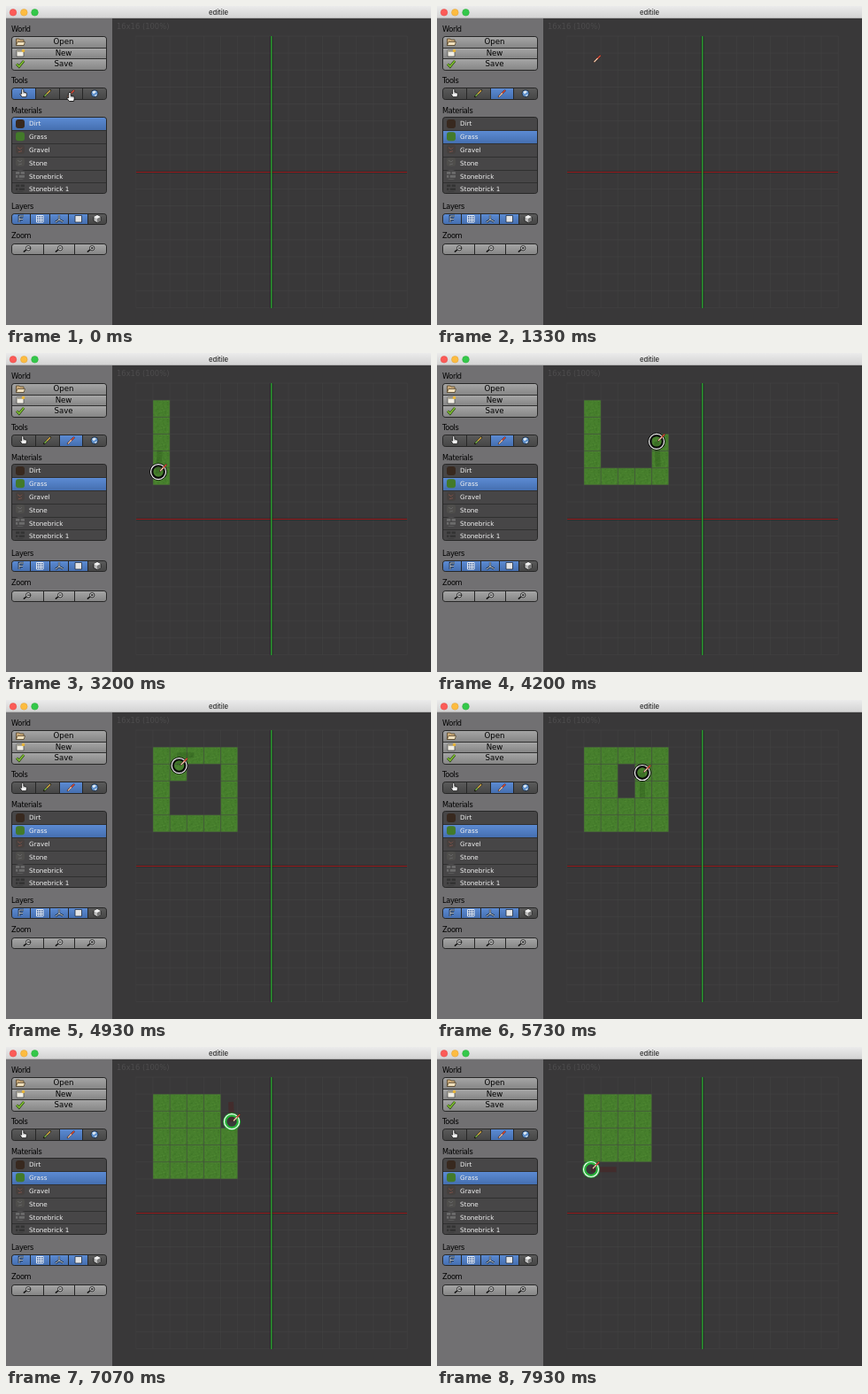
Recreate the animation shown at these times as an HTML page. Size 480x360 px, loop 8 s.

```html
<!DOCTYPE html>
<html lang="en">
<head>
<meta charset="utf-8">
<title>editile</title>
<style>
html, body { margin: 0; width: 100%; height: 100%; overflow: hidden; }
body { position: relative; background: #393839; font-family: "DejaVu Sans", sans-serif; }
#title {
  position: absolute; left: 0; top: 0; width: 480px; height: 14px; box-sizing: border-box;
  background: linear-gradient(#ebebeb, #d4d4d4); border-bottom: 1px solid #b4b4b4;
  font: 500 7.7px/15.6px Inter, sans-serif; color: #2b2b2b; text-align: center;
}
#side { position: absolute; left: 0; top: 14px; width: 120px; height: 346px; background: #717072; }
h2 {
  position: absolute; left: 6px; margin: 0; font-weight: normal; font-size: 8.2px;
  line-height: 10px; letter-spacing: -.35px; color: #000;
}
.bar {
  position: absolute; left: 6px; width: 108px; box-sizing: border-box; display: flex;
  border: 1px solid #272727; border-radius: 3.5px; overflow: hidden; background: #272727;
}
.col { flex-direction: column; }
.bar > div { flex: 1; background: linear-gradient(#5a5a5a, #464646); }
.bar > div + div { border-left: 1px solid #272727; }
.bar.col > div + div { border-left: 0; border-top: 1px solid #303030; }
.bar.light > div { background: linear-gradient(#a5a5a5, #868686); }
.col.light { font-size: 8.6px; line-height: 11.6px; text-align: center; text-indent: 10px; color: #000; }
#mats { font-size: 7.2px; line-height: 13.8px; text-indent: 19px; color: #f0f0f0; }
#mats > div { background: #474647; }
.bar > div.on, #mats > div.on { background: linear-gradient(#5c8bd3, #456fb0); }
svg { position: absolute; left: 0; top: 0; }
</style>
</head>
<body>
<div id="side"></div>
<div id="title">editile</div>

<h2 style="top:20.5px">World</h2>
<div class="bar col light" style="top:34px;height:38.5px"><div>Open</div><div>New</div><div>Save</div></div>
<h2 style="top:79px">Tools</h2>
<div class="bar" id="tools" style="top:92px;height:13.5px"><div></div><div></div><div></div><div></div></div>
<h2 style="top:112.5px">Materials</h2>
<div class="bar col" id="mats" style="top:125.4px;height:86.5px"><div>Dirt</div><div>Grass</div><div>Gravel</div><div>Stone</div><div>Stonebrick</div><div>Stonebrick 1</div></div>
<h2 style="top:220.5px">Layers</h2>
<div class="bar" style="top:233.5px;height:13.5px"><div class="on"></div><div class="on"></div><div class="on"></div><div class="on"></div><div></div></div>
<h2 style="top:254px">Zoom</h2>
<div class="bar light" style="top:267.5px;height:13.5px"><div></div><div></div><div></div></div>

<svg width="480" height="360" viewBox="0 0 480 360">
  <defs>
    <g id="hand">
      <path d="M-1.3 0Q0-1.6 1.2 0V3.2L4.6 4Q5.6 4.4 5.3 6L4.6 9.5H-.6L-3.4 6Q-3.6 4.6-1.3 5.6Z" fill="#f4f4f4" stroke="#111" stroke-width=".9"/>
      <path d="M1.2 3.4V5.2M2.8 3.8V5.4M4.2 4V5.6" stroke="#222" stroke-width=".5"/>
    </g>
    <g id="brush" stroke-linecap="round">
      <path d="M2-1L8.8-7.8" stroke="#3a1d18" stroke-width="2"/>
      <path d="M5-4L8.8-7.8" stroke="#e0503c" stroke-width="1.3"/>
      <path d="M2.3-1.2L5.6-4.6" stroke="#f0cdb0" stroke-width="1.3"/>
    </g>
    <g id="lens">
      <path d="M-1 1L-3.600 3.200" stroke="#151515" stroke-width="1.600" stroke-linecap="round"/>
      <circle cx="1.200" cy="-.800" r="2.700" fill="#c9c9c9" stroke="#222" stroke-width=".9"/>
    </g>
    <g id="grass"></g>
  </defs>

  <g stroke-width=".5">
    <circle cx="8" cy="7.3" r="3.8" fill="#fc5b57" stroke="#df4744"/>
    <circle cx="20.3" cy="7.3" r="3.8" fill="#fdbc40" stroke="#de9f34"/>
    <circle cx="32.5" cy="7.3" r="3.8" fill="#34c84a" stroke="#27aa35"/>
  </g>

  <!-- file icons -->
  <path d="M11.5 44.5V37H15L16 38H20V44.5Z" fill="#c9a878" stroke="#4a3a22" stroke-width=".7"/>
  <path d="M11.5 44.5L13 40.5H21.5L20 44.5Z" fill="#f0e0bd" stroke="#4a3a22" stroke-width=".7"/>
  <path d="M12 50H20V57H12Z" fill="#f1eee4" stroke="#444" stroke-width=".7"/>
  <path d="M12 50H20V52H12Z" fill="#a9a596"/>
  <circle cx="19.5" cy="50.5" r="1.8" fill="#e8b53a"/>
  <path d="M12 65.5L14.8 68.3L20.2 61.8" fill="none" stroke="#26400f" stroke-width="2.8"/>
  <path d="M12 65.5L14.8 68.3L20.2 61.8" fill="none" stroke="#7fc030" stroke-width="1.6"/>

  <!-- tool icons -->
  <use href="#hand" transform="translate(18.8 94.3) scale(.88)"/>
  <path d="M43 102.2L50 95.2" stroke="#1c1c12" stroke-width="2.2" stroke-linecap="round"/>
  <path d="M43.5 101.7L46 99.2" stroke="#7fbf4a" stroke-width="1.3"/>
  <path d="M46 99.2L50 95.2" stroke="#e5b64a" stroke-width="1.3"/>
  <use href="#brush" x="67.8" y="103.3"/>
  <circle cx="100" cy="98.7" r="4" fill="#5d8fcb" stroke="#1d2733" stroke-width=".8"/>
  <path d="M97.3 97Q100 94.6 102 97Q100 98 99 99.5Z" fill="#dfe9f2"/>
  <path d="M100 101Q102 99.2 103 100Q102 102 100.5 102Z" fill="#cfdbe6"/>

  <g id="swatches"></g>

  <!-- layer icons -->
  <path d="M15 244V237H20M15 240.5H19" fill="none" stroke="#14202f" stroke-width="2.6"/>
  <path d="M15 244V237H20M15 240.5H19" fill="none" stroke="#c9d6e8" stroke-width=".9"/>
  <path d="M34.5 236.5H42V244H34.5ZM37 236.5V244M39.5 236.5V244M34.5 239H42M34.5 241.5H42" fill="#3d62a0" stroke="#eef2f7" stroke-width=".9"/>
  <path d="M60 236V241L56 244M60 241L64.5 243.5" fill="none" stroke="#15202e" stroke-width="2.2"/>
  <path d="M60 236V241L56 244M60 241L64.5 243.5" fill="none" stroke="#dfe8f2" stroke-width=".9"/>
  <path d="M78 236.5H85.5V244H78Z" fill="#e4e4e4" stroke="#1f2c40" stroke-width=".8"/>
  <path d="M103 236L107 238V242.5L103 244.7L99 242.5V238Z" fill="#bdbdbd" stroke="#111" stroke-width=".8"/>
  <path d="M99 238L103 240L107 238L103 236Z" fill="#f2f2f2"/>
  <path d="M103 240L107 238V242.5L103 244.7Z" fill="#777"/>

  <!-- zoom icons -->
  <use href="#lens" x="24" y="274"/><use href="#lens" x="60" y="274"/><use href="#lens" x="96" y="274"/>
  <path d="M24 273.2H28M60 273.2H62.5M96 273.2H98.5M97.2 272V274.4" stroke="#111" stroke-width="1"/>

  <text x="125" y="26.4" font-size="8.4" fill="#4d4c4d">16x16 (100%)</text>
  <g id="tiles"></g>
  <path id="grid" stroke="#484748" stroke-opacity=".55" stroke-width=".8"/>
  <path d="M147 187.5H453" stroke="#1c1a1c" stroke-opacity=".35" stroke-width="3"/>
  <path d="M147 187.5H453" stroke="#961a1d"/>
  <path d="M299.8 34V341" stroke="#141814" stroke-opacity=".5" stroke-width="3.2"/>
  <path d="M299.8 34V341" stroke="#2cc035" stroke-width="1.1"/>

  <path id="trail" fill="none" stroke-width="6"/>
  <g id="cursor">
    <g id="ring" fill="none">
      <circle id="halo" r="7.8" stroke-width="4.2"/>
      <circle r="8.5" stroke="#f4f4f4" stroke-width="1.2"/>
    </g>
    <use id="shape" href="#hand"/>
  </g>
</svg>

<script>
const LOOP = 8000, CELL = 19.15, LEFT = 146.8, TOP = 34, STEP = 5;
const $ = id => document.getElementById(id);

// pointer path: time, x, y
const path = [
  [0, 72, 98], [300, 72, 98], [700, 44, 147], [930, 44, 147], [1330, 175.5, 64],
  [1530, 175.5, 64], [1730, 176, 64.5], [2000, 176.5, 64], [2200, 176.5, 64],
  [2450, 176, 76], [3000, 172, 136], [3200, 172, 134], [3300, 176, 139],
  [3680, 250, 140], [3860, 249, 108], [4200, 248, 100], [4480, 249, 63],
  [4850, 196, 62], [5240, 194, 120], [5490, 232, 120], [5730, 232, 82],
  [5890, 214, 81], [6080, 213, 104], [6300, 213, 104], [6750, 254, 62],
  [6860, 254, 62], [7070, 255, 84], [7400, 254, 139], [7930, 174, 138], [8000, 174, 138]
];
const presses = [
  { from: 120, to: 260 },
  { from: 800, to: 910 },
  { from: 2200, to: 6200, paint: true },
  { from: 6840, to: LOOP, paint: true, erase: true }
];

function posAt(t) {
  let i = 1;
  while (i < path.length - 1 && path[i][0] < t) i++;
  const [t0, x0, y0] = path[i - 1], [t1, x1, y1] = path[i];
  const k = (t - t0) / (t1 - t0);
  return [x0 + (x1 - x0) * k, y0 + (y1 - y0) * k];
}

// grass texture
let seed = 7;
const rand = () => (seed = seed * 16807 % 2147483647) / 2147483647;
let blades = `<rect width="${CELL}" height="${CELL}" fill="#477f2d"/>`;
for (let i = 0; i < 70; i++) {
  const color = rand() < .5 ? '#3c7226' : '#548e37';
  blades += `<rect x="${rand() * 17.5}" y="${rand() * 17.5}" width="1.5" height="1" fill="${color}" opacity=".5"/>`;
}
$('grass').innerHTML = blades;

// material swatches
$('swatches').innerHTML = ['#38291f', '#437a2a', '#46403e', '#4f4e4c', '#6c6c6c', '#333'].map((color, i) => {
  const y = 128 + i * 14.35;
  const base = `<rect x="11" y="${y}" width="10" height="10" rx="3" fill="${color}"/>`;
  const pebbles = `<path d="M13 ${y + 3}l3 2 2-2M14 ${y + 8}l4-1" stroke="${i === 2 ? '#7a5148' : '#666'}" fill="none"/>`;
  const joints = `<path d="M11 ${y + 1}h10M11 ${y + 5}h10M11 ${y + 9}h10M16 ${y + 1}v4M14 ${y + 5}v4" stroke="#474647" stroke-width="1.4"/>`;
  return base + (i < 2 ? '' : i < 4 ? pebbles : joints);
}).join('');

// grid lines
let lines = '';
for (let i = 0; i <= 16; i++) {
  const d = i * CELL, span = 16 * CELL;
  lines += `M${LEFT + d} ${TOP}v${span}M${LEFT} ${TOP + d}h${span}`;
}
$('grid').setAttribute('d', lines);

// when each cell is painted and erased
const cells = new Map();
for (const p of presses.filter(p => p.paint)) {
  for (let t = p.from; t < p.to; t += STEP) {
    const [x, y] = posAt(t);
    const col = Math.floor((x - LEFT) / CELL), row = Math.floor((y - TOP) / CELL);
    const key = col + ',' + row;
    if (!cells.has(key)) cells.set(key, { col, row, on: Infinity, off: Infinity });
    const cell = cells.get(key), edge = p.erase ? 'off' : 'on';
    cell[edge] = Math.min(cell[edge], t);
  }
}
for (const cell of cells.values()) {
  cell.node = document.createElementNS('http://www.w3.org/2000/svg', 'use');
  cell.node.setAttribute('href', '#grass');
  cell.node.setAttribute('x', LEFT + cell.col * CELL);
  cell.node.setAttribute('y', TOP + cell.row * CELL);
  $('tiles').append(cell.node);
}

// faint smear over the last stretch of a stroke
function trailPath(t, from) {
  let [x, y] = posAt(t), d = `M${x} ${y}`, left = 28;
  for (let s = t - STEP; s > from && left > 0; s -= STEP) {
    const [px, py] = posAt(s);
    left -= Math.hypot(px - x, py - y);
    [x, y] = [px, py];
    d += `L${x} ${y}`;
  }
  return d;
}

const select = (id, n) => [...$(id).children].forEach((el, i) => el.classList.toggle('on', i === n));
const show = (el, on) => { el.style.display = on ? '' : 'none'; };

function draw(t) {
  const [x, y] = posAt(t);
  const press = presses.find(p => t >= p.from && t < p.to);
  select('tools', t < 200 ? 0 : 2);
  select('mats', t < 850 ? 0 : 1);
  for (const c of cells.values()) show(c.node, t >= c.on && t < c.off);

  $('cursor').setAttribute('transform', `translate(${x} ${y})`);
  $('shape').setAttribute('href', x < 120 ? '#hand' : '#brush');
  show($('ring'), press);
  show($('trail'), press && press.paint);
  if (!press) return;
  $('halo').setAttribute('stroke', press.erase ? '#27b53a' : '#0c0c0c');
  if (press.paint) {
    $('trail').setAttribute('d', trailPath(t, press.from));
    $('trail').setAttribute('stroke', press.erase ? 'rgba(90,15,15,.3)' : 'rgba(0,30,0,.14)');
  }
}

const start = performance.now();
function tick() {
  draw((performance.now() - start) % LOOP);
  requestAnimationFrame(tick);
}
tick();
</script>
</body>
</html>
```
